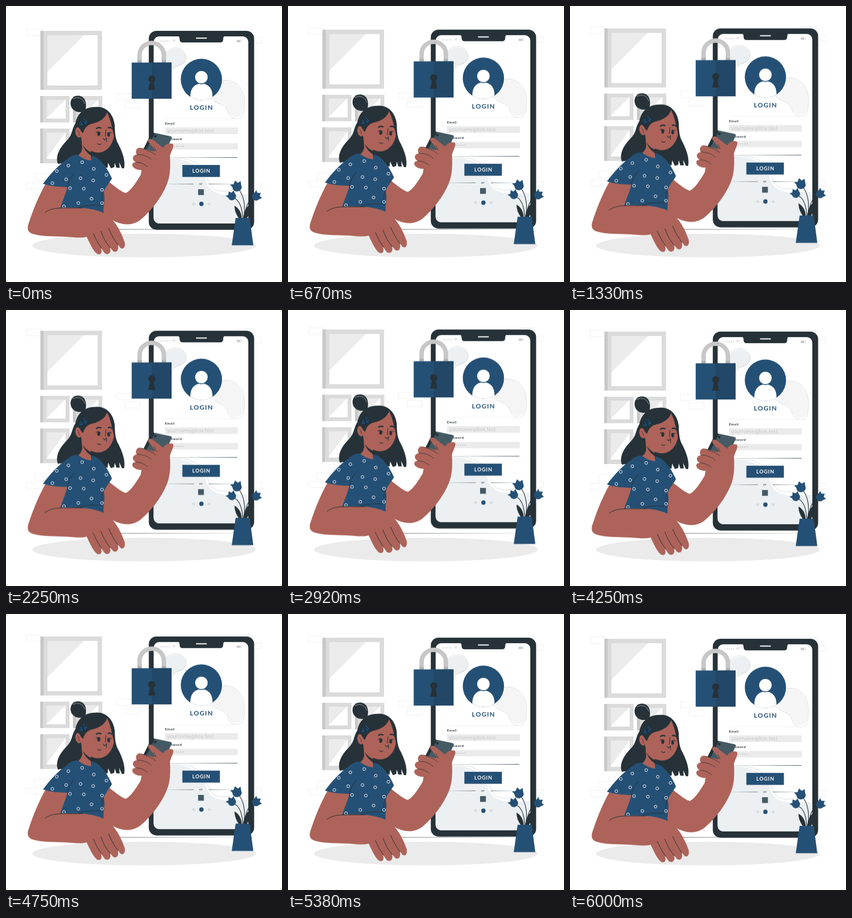
Write an HTML page that moves like this. It is 500 px wide and 500 px high and loops after 6040 ms.

```html
<!DOCTYPE html>
<html lang="en">
<head>
<meta charset="utf-8">
<title>Login</title>
<style>
  html, body { margin: 0; width: 100%; height: 100%; overflow: hidden; background: #fff; }
  svg { display: block; width: 100%; height: 100%; }
  text { font-family: Lato, "Open Sans", sans-serif; font-weight: 700; }
  .float { animation: float 6040ms linear infinite; }
  @keyframes float {
    0%, 100% { transform: translateY(0); }
    50% { transform: translateY(-10px); }
  }
  .navy { fill: #255075; }
  .dark { fill: #263238; }
  .skin { fill: #ad6359; }
  .pale { fill: #ebebeb; }
  .grey { fill: #dbdbdb; }
  .mid { fill: #c7c7c7; }
  .white { fill: #fff; }
  .line { fill: none; stroke: #263238; stroke-linecap: round; stroke-linejoin: round; }
  .edge { fill: none; stroke: #d6d6d6; stroke-width: .8; }
  .brick { fill: none; stroke: #ebebeb; stroke-width: .8; }
</style>
</head>
<body>
<svg viewBox="0 0 500 500" xmlns="http://www.w3.org/2000/svg">
  <defs>
    <clipPath id="screen"><rect x="267.500" y="55" width="171.500" height="339" rx="10"/></clipPath>
    <clipPath id="face-disc"><circle cx="354" cy="133" r="37.4"/></clipPath>
    <clipPath id="shirt-clip"><use href="#shirt"/></clipPath>
    <marker id="ring" markerUnits="userSpaceOnUse" markerWidth="8" markerHeight="8" refX="4" refY="4">
      <circle cx="4" cy="4" r="2.6" fill="none" stroke="#fff" stroke-width=".9"/>
    </marker>
    <g id="pane">
      <rect class="grey" width="53" height="48"/>
      <rect class="mid" width="5" height="48"/>
      <rect class="white" x="12" y="7" width="34" height="34"/>
      <path class="pale" d="M12 7h33l-33 33z"/>
    </g>
    <path id="flower" d="M0 0C-7 0-10-6-8-11L-10-17L-4-15L1-20L4-14L10-15L8-8C8-3 5 0 0 0Z"/>
    <path id="shirt" d="M131 270C124 268 117 272 110 278C93 290 79 306 67 322C80 327 97 328 111 328C108 341 102 354 98 366C124 374 153 378 177 376C175 364 181 351 177 338C178 331 187 321 192 312.500C185 297 175 281 163 274L155 271L154 280C145 279 136 275 131 270Z"/>
  </defs>

  <ellipse class="pale" cx="250" cy="434" rx="202.5" ry="21.5"/>
  <path class="dark" d="M140 404.200L461 404.500L140 405.100Z"/>

  <g class="float">
    <!-- wall -->
    <path class="brick" d="M37 42h26v12h-26zM420 42h27v11h-27zM437 57h26v10h-26zM200 159h31v11h-31zM216 174h27v11h-27zM52 304h30v12h-30zM37 320h30v11h-30zM440 320h23v11h-23z"/>
    <rect class="grey" x="62.5" y="45" width="111.5" height="107"/>
    <rect class="mid" x="62.5" y="45" width="5.5" height="107"/>
    <rect class="white" x="75" y="53" width="91" height="91"/>
    <path class="pale" d="M75 53h66l-66 66z"/>
    <use href="#pane" x="62" y="163"/>
    <use href="#pane" x="121.500" y="163"/>
    <rect class="grey" x="62" y="222" width="53" height="63"/>
    <rect class="mid" x="62" y="222" width="5" height="63"/>
    <rect class="white" x="74" y="229" width="34" height="48"/>
    <path class="pale" d="M74 229h34l-34 46z"/>

    <!-- big phone -->
    <rect class="dark" x="258.700" y="45" width="190.800" height="360.400" rx="14"/>
    <rect class="white" x="267.500" y="55" width="171.500" height="339" rx="10"/>
    <g clip-path="url(#screen)">
      <path fill="#ecf0f3" d="M267 290C284 276 304 274 324 280C345 286 357 298 361 313C365 329 374 338 390 341C408 344 427 337 440 347V395H267Z"/>
      <path class="edge" d="M290 277C320 271 344 282 354 292C365 303 365 328 382 334C399 339 407 330 419 336C430 341 433 344 440 342"/>
      <path fill="#ecf0f3" d="M282 92C290 82 303 75 314 78C326 82 330 96 323 103C315 112 308 108 303 114C298 120 286 120 282 110Z"/>
      <path class="edge" d="M286 88C295 74 311 73 320 80C330 89 327 100 319 105C310 109 307 109 301 117"/>
      <path fill="#f5f5f5" d="M370 150C384 133 403 131 416 141C429 151 433 170 431 184C429 202 416 206 407 197C398 187 401 181 388 177C373 172 361 165 370 150Z"/>
      <path class="edge" d="M388 137C403 130 419 138 427 152C434 165 434 190 427 201C418 209 404 202 402 191C399 181 390 179 378 173"/>
    </g>
    <path class="dark" d="M309 54C313 54 314.500 56 314.500 60Q314.500 66 320 66H388Q393.500 66 393.500 60C393.500 56 395 54 399 54Z"/>
    <path d="M345 58.300H363" stroke="#fff" stroke-width="2" stroke-linecap="round"/>
    <path d="M281 63.500H297" stroke="#c7c7c7" stroke-width="2" stroke-dasharray="0 3.700" stroke-linecap="round"/>
    <path d="M301 62.500q3-2.600 6 0M302.500 64.300q1.500-1.300 3 0" fill="none" stroke="#c7c7c7"/>
    <rect class="mid" x="418" y="61.500" width="6.500" height="4" rx=".8"/>
    <path d="M425.300 61.500h1.200v4h-1.200" fill="none" stroke="#c7c7c7" stroke-width=".7"/>

    <!-- login form -->
    <circle class="navy" cx="354" cy="133" r="37.400"/>
    <g class="white" clip-path="url(#face-disc)">
      <path d="M334 172V163C334 149 342 140.500 354 140.500S374 149 374 163V172Z"/>
      <circle cx="354" cy="129" r="12" stroke="#255075" stroke-width="1.300"/>
    </g>
    <text class="navy" x="333" y="188" font-size="11.800" letter-spacing="1.200">LOGIN</text>
    <path d="M288 204.500H420" stroke="#f0f0f0" stroke-width=".8"/>
    <g class="dark" font-size="6.200" letter-spacing=".55">
      <text x="288" y="215.200">Email</text>
      <text x="288" y="243.200">Password</text>
      <text x="350" y="324.500" style="font-weight:400">or</text>
    </g>
    <path class="pale" d="M288 220h132v12H288zM288 248.500h132v11.500H288z"/>
    <text x="292" y="229.300" font-size="9.200" letter-spacing=".35" fill="#aaa" style="font-weight:300">yourname@box.test</text>
    <path d="M293 254.300H322" stroke="#c0c0c0" stroke-width="2" stroke-dasharray="0 4" stroke-linecap="round"/>
    <path fill="#455a64" d="M288 274.400L419 274.100V274.900ZM284 322.300L340 321.900V322.700ZM420 322.300L367 321.900V322.700Z"/>
    <rect class="navy" x="319.500" y="288" width="68" height="21.700"/>
    <text class="white" x="337.500" y="302.300" font-size="9.200" letter-spacing=".9">LOGIN</text>
    <rect x="348" y="332" width="10.500" height="10.500" fill="#455a64"/>
    <circle class="grey" cx="340" cy="358.500" r="2.600"/>
    <circle class="navy" cx="354" cy="358.500" r="3.900"/>
    <circle class="grey" cx="368" cy="358.500" r="2.600"/>

    <!-- padlock -->
    <path d="M242 103V89A22 22 0 0 1 286 89V103" fill="none" stroke="#c7c7c7" stroke-width="8"/>
    <path d="M238 98h8v5h-8zM282 98h8v5h-8z" fill="#b2b2b2"/>
    <rect class="navy" x="227.700" y="102.500" width="72.300" height="65.500"/>
    <rect x="264" y="102.500" width="36" height="65.500" fill="#224767"/>
    <path class="dark" d="M264 125.700a6.400 6.400 0 0 1 3.200 11.900L270.300 152H257.500L260.800 137.600A6.400 6.400 0 0 1 264 125.700Z"/>

    <!-- plant -->
    <path class="line" stroke-width="1.200" d="M430 385C435 365 431 345 423 334M429 385C428 368 424 354 415 349M433 385C433 367 438 351 449 348"/>
    <path class="dark" d="M414 362C422 366 427 375 427 385H422C417 378 414 370 414 362ZM443 359C434 364 430 375 431 385H436C442 377 444 368 443 359Z"/>
    <g class="navy">
      <use href="#flower" transform="translate(422 335) rotate(-24)"/>
      <use href="#flower" transform="translate(414 350) rotate(-40) scale(.88)"/>
      <use href="#flower" transform="translate(448 350) rotate(48) scale(.88)"/>
      <path d="M416 384H441.500L448 433.500H409Z"/>
    </g>

    <!-- hair behind -->
    <path class="dark" d="M126 212C118 225 121 233 110 244C97 257 89 272 94 286L101 285L105 287L130 286L165 291L184 293L185 284L190 294L196 292L197 284L200 293H206L205 283L210 294H214C217 280 210 263 204 251C195 235 199 222 195.500 209C191 190 177 182 162 183C141 184 129 196 126 212Z"/>
    <path class="dark" d="M140 191C130 195 118 189 117 178C116 167 125 161 134 163C143 165 147 175 144 188Z"/>
    <path d="M121 168Q137 161 143 177" fill="none" stroke="#fff" stroke-width=".5"/>

    <!-- right arm -->
    <path class="skin" d="M182 315C194 324 207 336 217 339C227 334 236 319 244 306L246 295L252 262L288 262C291 252 296 248 302 250C306 253 299 263 297 271C298 292 298 307 291 324C281 348 263 371 244 387C228 400 202 400 174 374L172 340Z"/>

    <!-- hand-held phone -->
    <path class="dark" d="M263 231Q264 228.500 267 229L272 232L256 264L248 261Z"/>
    <path fill="#455a64" d="M270 230L298 236Q301.500 237 300 240L289 263L253 263Z"/>
    <circle class="dark" cx="270.500" cy="236" r="2.400"/>
    <path class="skin" d="M258 246C256 241 262 239 267 243L285 257C288 250 295 248 302 250C305 255 298 264 296 275L291 293L246 297C239 298 230 294 229 289C228 285 231 283 235 283C227 278 229 270 237 269C233 264 237 255 244 257L270 264C270 259 261 251 258 246Z"/>
    <path class="line" stroke-width=".8" d="M238 269C249 269 258 273 263 278M236 283C245 283 251 287 256 291M246 258C256 261 264 264 271 270M268 255L272 263"/>

    <!-- neck and shirt -->
    <path class="skin" d="M136 232L138 258C137 265 134 268 130 271L134 284L155 286C157 281 152 274 154 262L166 258Z"/>
    <path class="dark" d="M139 252C145 260 149 263 155 265L154 271C147 266 142 261 139 252Z"/>
    <path class="skin" d="M74 317H118V332L106 368L60 370Z"/>
    <use href="#shirt" class="navy"/>
    <g clip-path="url(#shirt-clip)">
      <polyline fill="none" marker-start="url(#ring)" marker-mid="url(#ring)" marker-end="url(#ring)" points="113,289 92,299 84,321 109,314 138,283 159,295 135,312 182,306 158,316 116,330 141,331 174,333 155,349 131,357 105,363 174,357"/>
    </g>
    <path class="line" stroke-width="1" d="M111 328C113 318 118 309 124 303M177 338C174 341 173 348 174 354M131 365C145 361 158 360 171 361"/>

    <!-- head -->
    <ellipse class="skin" cx="131.500" cy="229" rx="5.800" ry="9.500" transform="rotate(-12 131.500 229)"/>
    <path class="skin" d="M181 189C190 196 195.500 212 196 230C196 248 184 265 168 265.500C152 266 140 254 136 238L134 224L148 199Z"/>
    <path class="dark" d="M184 190C181 203 170 210 157 213C148 215 143 220 140 229C138 233 135 222 130 219L126 214C128 196 141 183 162 183C171 182 179 185 184 190Z"/>
    <path class="dark" d="M180 187C190 193 196 204 197 218L197 240C192 224 191 205 180 187Z"/>
    <path class="line" stroke-width=".8" d="M129 225Q133 228 133 234"/>
    <path class="line" stroke-width="2.400" d="M164 222Q167 219 172 221M185.500 220.500Q190 219 192 222"/>
    <ellipse class="dark" cx="168" cy="231.500" rx="2.700" ry="3.900"/>
    <ellipse class="dark" cx="186" cy="233" rx="2.500" ry="3.700"/>
    <path class="line" stroke-width="1.100" d="M163 229Q167 226 171 230M184 230Q188 228 191 230M181 224L180 236M176 240L179 243L182 239V246M166 249.500Q169 252.500 172 250"/>
    <g class="navy" stroke="#14293c" stroke-width=".8" stroke-linejoin="round">
      <path d="M139 200L148 210L142 216Z"/>
      <path d="M135 206L141 216L132 217Z"/>
      <path d="M142 206L144 211M135.500 211L136 214.500" stroke-width="1.300"/>
    </g>

    <!-- left arm -->
    <path class="skin" d="M71 323.500C84 327 98 328 111 328C107 342 101 354 98 366C113 364 127 366 141 366C157 368 172 371 182 378C196 387 208 407 215 428C217 437 212 442 207 438L202 431C206 442 200 448 194 444L188 437C192 447 185 452 179 448L171 437C176 447 171 452 165 449C158 444 152 430 146 418C138 421 124 419 108 418C89 417 64 418 49 413C39 410 37 403 42 391C50 367 59 345 71 323.500Z"/>
    <path class="line" stroke-width="1" d="M71 374C80 367 91 366 108 366H139M158 412Q164 426 173 439M172 408Q178 426 189 438M186 403Q193 420 203 433"/>
  </g>
</svg>
</body>
</html>
```
